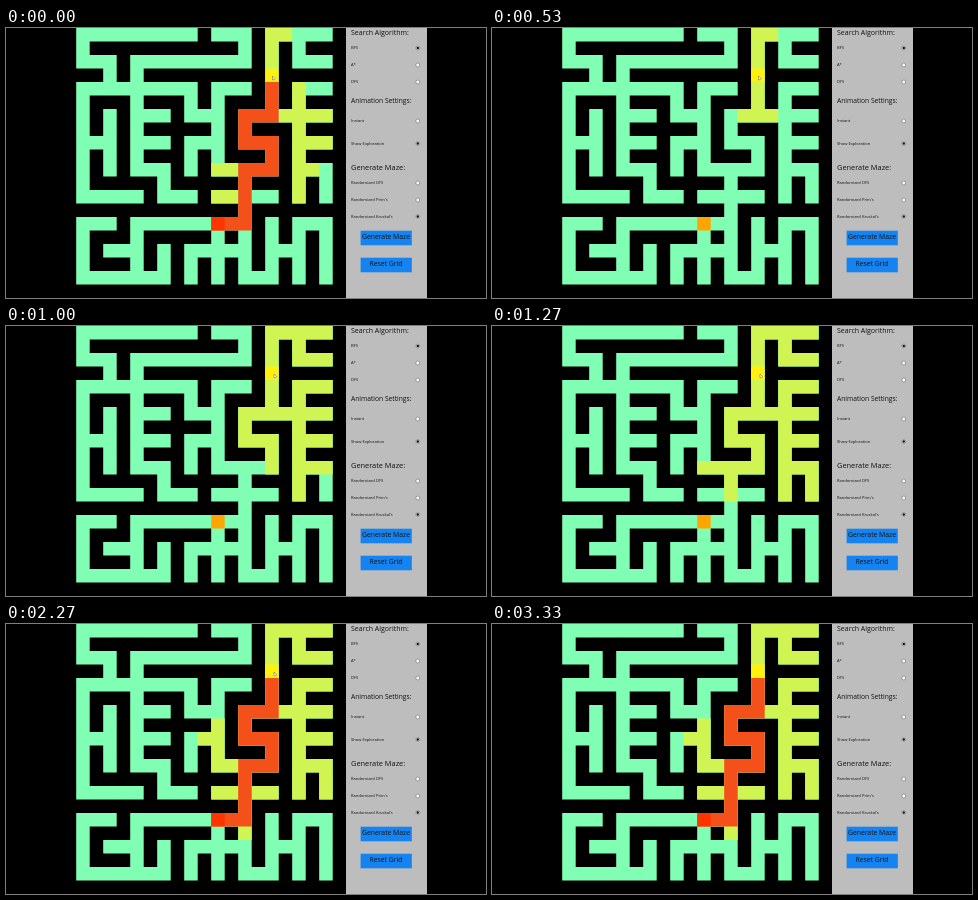
An HTML page with a canvas for the animation above (3540 ms loop, 480 by 270 pixels).

```html
<!DOCTYPE html>
<html lang="en">
<head>
<meta charset="utf-8">
<title>Maze search</title>
<style>
  html, body { margin: 0; width: 100%; height: 100%; overflow: hidden; background: #000; }
  canvas { display: block; width: 480px; height: 270px; }
</style>
</head>
<body>
<canvas id="stage" width="480" height="270"></canvas>
<script>
const ctx = document.getElementById('stage').getContext('2d');
const LOOP = 3540, SEARCH_START = 262, STEP = 66.7, CELL = 13.5, LEFT = 70.2;
const COLORS = {
  open: '#80ffb4', visited: '#d0f552', path: '#f4501a', reached: '#ff3500',
  start: '#fff010', goal: '#ffa500', panel: '#bdbdbd', button: '#1684f0'
};

const MAZE = [
  '.........#...#.....',
  '.###########.#.#.##',
  '...#.........#.#...',
  '##.#.#########.####',
  '.........#...#.#...',
  '.###.###.#.###.#.##',
  '.#.#...#...#.......',
  '.#.#.#####.#.###.##',
  '...#...#...#...#...',
  '.#.#.###.#.###.#.##',
  '.#.#...#.#.....#...',
  '.#####.#####.###.#.',
  '.....#...#.....#.#.',
  '############.######',
  '...#.........#.#...',
  '.###.#####.#.#.#.#.',
  '.#...#.#.....#...#.',
  '.###.#.#.#.#.#.#.#.',
  '.......#.#.#...#.#.'
];
const start = { x: 14, y: 3, depth: 0 };
const goal = { x: 10, y: 14 };

// Areas explored by the earlier search: column, row, width, height
const earlier = [
  [14, 0, 1, 3], [15, 0, 1, 1], [15, 6, 4, 1], [16, 4, 1, 9],
  [17, 8, 2, 1], [17, 10, 1, 1], [10, 10, 2, 1], [10, 12, 2, 1]
].map(([x, y, w, h]) => ({ x, y, w, h }));

// Breadth-first search, stopping at the goal
function search() {
  const nodes = [start], seen = new Set([start.x + ',' + start.y]);
  for (const node of nodes) {
    for (const [dx, dy] of [[0, -1], [1, 0], [0, 1], [-1, 0]]) {
      const x = node.x + dx, y = node.y + dy, key = x + ',' + y;
      if (MAZE[y]?.[x] !== '.' || seen.has(key)) continue;
      seen.add(key);
      const next = { x, y, depth: node.depth + 1, parent: node };
      nodes.push(next);
      if (x === goal.x && y === goal.y) return { nodes, end: next };
    }
  }
}

const corridors = MAZE.flatMap((row, y) =>
  [...row].flatMap((mark, x) => mark === '.' ? [{ x, y }] : []));
const { nodes, end } = search();
const explored = nodes.filter(n => n.depth < end.depth);
const path = [];
for (let n = end; n !== start; n = n.parent) path.unshift(n);

// One shared path keeps neighbouring cells free of seams
function fillCells(cells, color) {
  ctx.beginPath();
  for (const { x, y, w = 1, h = 1 } of cells) {
    ctx.rect(LEFT + x * CELL, y * CELL, w * CELL, h * CELL);
  }
  ctx.fillStyle = color;
  ctx.fill();
}

function label(text, x, y, size, align = 'left') {
  ctx.font = size + 'px "Open Sans", sans-serif';
  ctx.textAlign = align;
  ctx.fillStyle = '#111';
  ctx.fillText(text, x, y);
}

function option(text, y, checked) {
  label(text, 345, y, 4.1);
  ctx.beginPath();
  ctx.arc(411.8, y, 1.9, 0, Math.PI * 2);
  ctx.fillStyle = '#fff';
  ctx.fill();
  ctx.lineWidth = 0.5;
  ctx.strokeStyle = '#555';
  ctx.stroke();
  if (!checked) return;
  ctx.beginPath();
  ctx.arc(411.8, y, 1.2, 0, Math.PI * 2);
  ctx.fillStyle = '#111';
  ctx.fill();
}

function button(text, y) {
  ctx.fillStyle = COLORS.button;
  ctx.fillRect(354.6, y, 51.2, 14.6);
  label(text, 380, y + 7, 6.8, 'center');
}

function drawPanel() {
  ctx.fillStyle = COLORS.panel;
  ctx.fillRect(340, 0, 81, 270);
  ctx.textBaseline = 'middle';
  label('Search Algorithm:', 345, 5.5, 7);
  option('BFS', 20, true);
  option('A*', 37);
  option('DFS', 54);
  label('Animation Settings:', 345, 73, 6.7);
  option('Instant', 93);
  option('Show Exploration', 115.5, true);
  label('Generate Maze:', 345, 140.3, 7.4);
  option('Randomized DFS', 155);
  option('Randomized Prim\'s', 172);
  option('Randomized Kruskal\'s', 188.5, true);
  button('Generate Maze', 202.7);
  button('Reset Grid', 229.7);
}

function drawCursor(time) {
  if (time >= 3330) return;
  const move = Math.max(0, (time - 2990) / 340);
  const x = (time < 700 ? 266.5 : 268) + 126 * move, y = 48 + 174 * move;
  ctx.beginPath();
  ctx.moveTo(x, y);
  ctx.lineTo(x, y + 4);
  ctx.lineTo(x + 2.8, y + 2.8);
  ctx.closePath();
  ctx.fillStyle = '#fff';
  ctx.fill();
  ctx.lineWidth = 0.4;
  ctx.strokeStyle = '#333';
  ctx.stroke();
}

function draw(time) {
  ctx.fillStyle = '#000';
  ctx.fillRect(0, 0, 480, 270);
  fillCells(corridors, COLORS.open);

  const depth = Math.floor((time - SEARCH_START) / STEP);
  const beforeSearch = depth < 0;
  fillCells(beforeSearch ? earlier : explored.filter(n => n.depth <= depth), COLORS.visited);

  // The route appears in three quick stages once the goal is found
  const stage = beforeSearch ? 3 : Math.max(0, Math.min(3, depth - end.depth + 1));
  fillCells(path.slice(0, Math.ceil(path.length * stage / 3)), COLORS.path);
  fillCells([start], COLORS.start);
  fillCells([goal], stage === 3 ? COLORS.reached : COLORS.goal);

  drawPanel();
  drawCursor(time);
}

function tick() {
  draw(performance.now() % LOOP);
  requestAnimationFrame(tick);
}
tick();
</script>
</body>
</html>
```
